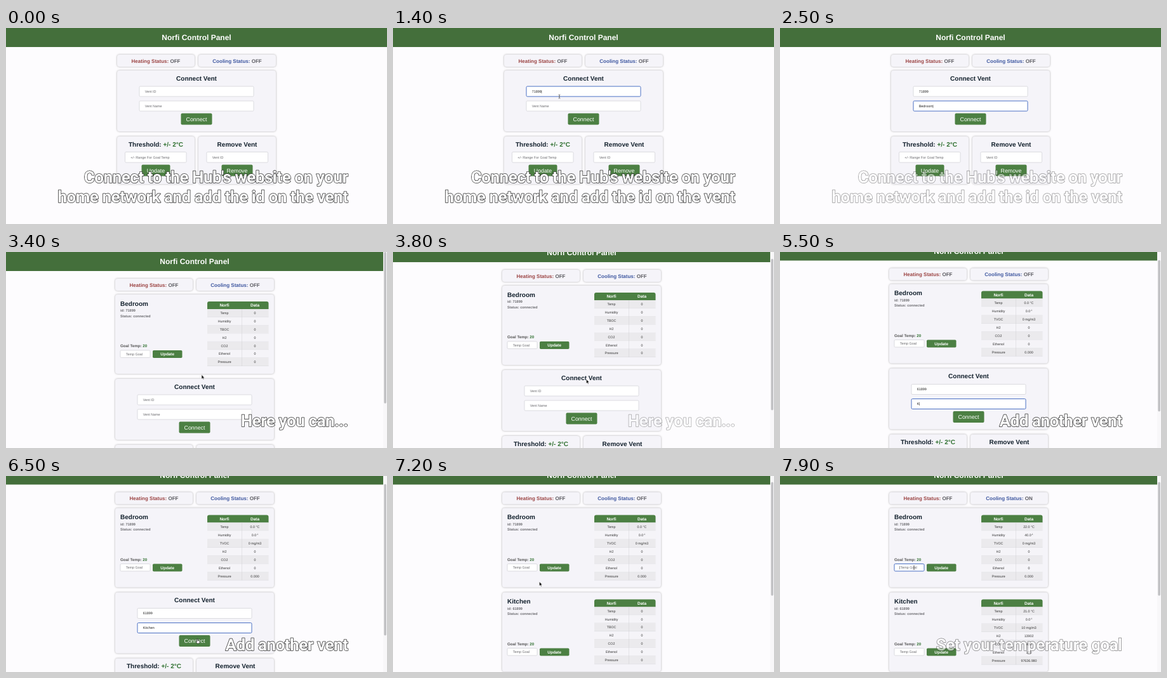
An HTML page that plays this animation: 600x309 px, repeating every 8 s.

```html
<!DOCTYPE html>
<html lang="en">
<head>
<meta charset="utf-8">
<style>
html, body { margin: 0; width: 100%; height: 100%; overflow: hidden; background: #fdfcfe; }
svg { display: block; width: 600px; height: 309px; font-family: "Liberation Sans", Arial, sans-serif;
  text-rendering: geometricPrecision; }
.b { font-weight: bold; }
.m { text-anchor: middle; }
.card { filter: drop-shadow(.7px .8px 1.7px rgba(0, 0, 0, .32)); }
.cap { font: bold 26px Roboto, sans-serif; letter-spacing: -.45px; text-anchor: end;
  fill: #fff; stroke: #2a2a2a; stroke-width: 1.4px; stroke-linejoin: round; paint-order: stroke; }
</style>
</head>
<body>
<svg id="stage" viewBox="0 0 600 309"></svg>
<script>
const LOOP = 8000, GREEN = '#4c8043', HEAD = '#446f3b', INK = '#14222e', GREY = '#6c6c70', GOAL = '#2f7030';
const stage = document.getElementById('stage');
const clamp = v => Math.max(0, Math.min(1, v));
const ramp = (t, a, b) => clamp((t - a) / (b - a));
const ease = k => k * k * (3 - 2 * k);
const typed = (s, t, a, b) => s.slice(0, Math.floor(ramp(t, a, b) * s.length + 1e-6));

const rect = (x, y, w, h, r, fill, more = '') =>
  `<rect x="${x}" y="${y}" width="${w}" height="${h}" rx="${r}" fill="${fill}" ${more}/>`;
const text = (x, y, size, s, fill = INK, cls = 'b m') =>
  `<text x="${x}" y="${y}" font-size="${size}" fill="${fill}" class="${cls}">${s}</text>`;
const tint = (s, fill) => `<tspan fill="${fill}">${s}</tspan>`;
const group = (x, y, s) => `<g transform="translate(${x} ${y})">${s}</g>`;
const card = (x, y, w, h) => rect(x, y, w, h, 4, '#f5f4f9', 'class="card"');

function input(x, y, w, h, hint, value = '', focus = false, caret = false) {
  const base = y + h / 2 + 1.9;
  const edge = focus ? 'stroke="#4a70c4" stroke-width="1"' : 'stroke="#cfcfd4" stroke-width=".7"';
  const line = caret ? '<tspan dx="-.6" fill="#111">|</tspan>' : '';
  const body = value ? tint(value, '#222') + line : line + hint;
  return rect(x, y, w, h, 1.6, '#fff', edge) + text(x + 8.7, base, 5.45, body, '#68686c', '');
}
const button = (cx, y, w, label) =>
  rect(cx - w / 2, y, w, 18, 2, GREEN) + text(cx, y + 12.1, 8.8, label, '#fff', 'm');

const status = (x, label, color, state) =>
  card(x, 42, 122, 19) + text(x + 61, 54.6, 8, tint(label + ' Status: ', color) + state, '#5c5c62');

const connectCard = (id, name, focus, caret) => card(175, 0, 250, 96) +
  text(300, 15.6, 10, 'Connect Vent') +
  input(210, 25, 180, 16, 'Vent ID', id, focus === 1, caret && focus === 1) +
  input(210, 48, 180, 16, 'Vent Name', name, focus === 2, caret && focus === 2) +
  button(300, 67.5, 49, 'Connect');

const bottomCards = () =>
  card(175, 0, 122, 75) + text(236, 15.6, 10, 'Threshold: ' + tint('+/- 2°C', GOAL)) +
  input(187.5, 24.5, 96.5, 16.5, '+/- Range For Goal Temp') + button(236, 44.5, 45, 'Update') +
  card(303, 0, 122, 75) + text(364, 15.6, 10, 'Remove Vent') +
  input(316, 24.5, 96.5, 16.5, 'Vent ID') + button(364, 44.5, 49, 'Remove');

// Before the first reading every cell is a bare zero.
function table(data) {
  const names = ['Temp', 'Humidity', data ? 'TVOC' : 'TBOC', 'H2', 'CO2', 'Ethenol', 'Pressure'];
  let y = 23;
  let out = `<path d="M317 23v-9a3 3 0 0 1 3-3h90.5a3 3 0 0 1 3 3v9z" fill="${GREEN}"/>` +
    text(344, 19.3, 6.5, 'Norfi', '#fff') + text(392, 19.3, 6.5, 'Data', '#fff');
  names.forEach((name, i) => {
    const h = data && i === 1 ? 13.8 : 12.85, base = y + h / 2 + 1.8;
    out += rect(317, y, 96.5, h, 0, i % 2 ? '#f5f4f8' : '#ebeaed') +
      rect(317, y + h - .5, 96.5, .5, 0, '#d8d8dc') +
      text(344, base, 5.3, name, '#333', 'm') +
      text(392, base, 5.3, data ? data[i] : '0', '#333', 'm');
    y += h;
  });
  return out + rect(371, 23, .5, y - 23, 0, '#d0d0d4');
}
const reading = (temp, hum, tvoc, h2, co2, eth, pres) =>
  [temp + ' °C', hum + '<tspan dy="-1.8" font-size="3.4">-1</tspan>', tvoc + ' mg/m3', h2, co2, eth, pres];

const ventCard = (name, id, data, focus, caret) => card(172, 0, 250, 125) +
  text(180, 17.6, 10, name, INK, 'b') +
  text(180, 27.2, 5.6, 'id: ' + id, GREY, 'b') +
  text(180, 35.6, 5.5, 'Status: connected', GREY, 'b') +
  text(180, 83.3, 6.2, 'Goal Temp: ' + tint('20', GOAL), '#555', 'b') +
  input(180, 88, 47, 11.5, 'Temp Goal', '', focus, caret) +
  rect(231, 88, 46.5, 12, 1.8, GREEN) + text(254.2, 96.3, 6.4, 'Update', '#fff') +
  table(data);

// Fade-in start and end, fade-out start and end, lines.
const captions = [
  [-600, -500, 2250, 2750, "Connect to the Hub's website on your", 'home network and add the id on the vent'],
  [2750, 3250, 3500, 4000, 'Here you can...'],
  [4100, 4600, 6600, 7100, 'Add another vent'],
  [7450, 8200, 9000, 9500, 'Set your temperature goal']
];
const caption = t => captions.map(([a, b, c, d, ...lines]) => {
  const alpha = ramp(t, a, b) - ramp(t, c, d);
  if (alpha <= 0) return '';
  return `<g class="cap" opacity="${alpha}">` + lines.map((s, i) =>
    `<text x="538.5" y="${274.7 - 30.5 * (lines.length - 1 - i)}">${s}</text>`).join('') + '</g>';
}).join('');

const shapes = {
  beam: '<path d="M-1.5-3.2Q0-3.2 0-2.2V2.2Q0 3.2-1.5 3.2M1.5-3.2Q0-3.2 0-2.2V2.2Q0 3.2 1.5 3.2" fill="none" stroke="#555" stroke-width=".6"/>',
  arrow: '<path d="M0-2.5V4.2L1.6 2.8 2.7 5 3.7 4.5 2.7 2.4H4.7Z" fill="#111" stroke="#fff" stroke-width=".5"/>',
  hand: '<path d="M-1-3.5H.2V-.5L3-.1V2.2L2 4H-1.2L-3 .8-2.2.2-1 1.2Z" fill="#fff" stroke="#111" stroke-width=".6"/>'
};
// Pointer path: time, x, y, shape used until the next stop ('' hides it).
const path = [
  [100, 300, 186, 'arrow'], [300, 275, 118, 'beam'], [500, 262, 102, 'beam'], [700, 262, 102, ''],
  [1300, 262, 104, 'beam'], [1400, 262, 108, 'beam'], [1650, 262, 124, 'beam'], [1850, 262, 124, ''],
  [2550, 262, 124, 'beam'], [2800, 296, 144, 'hand'], [3050, 300, 146, 'arrow'], [3350, 308, 196, 'arrow'],
  [3700, 308, 196, 'arrow'], [3950, 298, 216, 'beam'], [4250, 298, 216, ''],
  [6200, 298, 240, 'beam'], [6400, 302, 260, 'hand'], [6850, 302, 260, 'arrow'],
  [7350, 211, 144.5, 'beam'], [8000, 211, 144.5, 'beam']
];
function pointer(t) {
  const i = path.findIndex(p => p[0] > t);
  if (i < 1) return '';
  const [a, x, y, shape] = path[i - 1], [b, x2, y2] = path[i];
  const k = ease(ramp(t, a, b));
  return shape ? group(x + (x2 - x) * k, y + (y2 - y) * k, shapes[shape]) : '';
}

function draw(t) {
  const paired = t >= 3000, both = t >= 6900, live = t >= 7500;
  const dx = paired ? -3 : 0;
  const scroll = 16.5 * ease(ramp(t, 3500, 3900));
  const connect = paired
    ? connectCard(typed('61899', t, 4200, 4650), typed('Kitchen', t, 5400, 6050),
      t < 4050 ? 0 : t < 5250 ? 1 : 2, t < 6200)
    : connectCard(typed('71899', t, 700, 1350), typed('Bedroom', t, 1850, 2450),
      t < 400 ? 0 : t < 1700 ? 1 : 2, t < 2600);
  let page = rect(-5, -5, 610, 35, 0, HEAD) + text(300 + dx, 19.4, 12, 'Norfi Control Panel', '#fff') +
    group(dx, 0, status(175, 'Heating', '#9c4544', 'OFF') +
      status(303, 'Cooling', '#3f58a0', live ? 'ON' : 'OFF'));
  let y = 67;
  if (paired) {
    const first = t < 5000 ? null : live ? reading('22.0', '40.0', 0, 0, 0, 0, '0.000')
      : reading('0.0', '0.0', 0, 0, 0, 0, '0.000');
    page += group(0, y, ventCard('Bedroom', '71899', first, live, live));
    y += 133;
  }
  if (both) {
    const second = live ? reading('21.0', '0.0', 10, 13902, 400, 100, '97636.980') : null;
    page += group(0, y, ventCard('Kitchen', '61899', second));
    y += 133;
  }
  page += group(dx, y, connect) + group(dx, y + 104, bottomCards());
  let bar = '';
  if (paired) {
    const full = both ? 533 : 400;
    bar = rect(594, 0, 6, 309, 0, '#f8f7f9') +
      rect(595.3, scroll * 309 / full, 3.6, 309 * 309 / full, 1.8, '#c1c1c4');
  }
  stage.innerHTML = group(0, -scroll, page) + bar + pointer(t) + caption(t);
}

const start = performance.now();
function tick(now) {
  draw(Math.max(0, now - start) % LOOP);
  requestAnimationFrame(tick);
}
draw(0);
requestAnimationFrame(tick);
</script>
</body>
</html>
```
